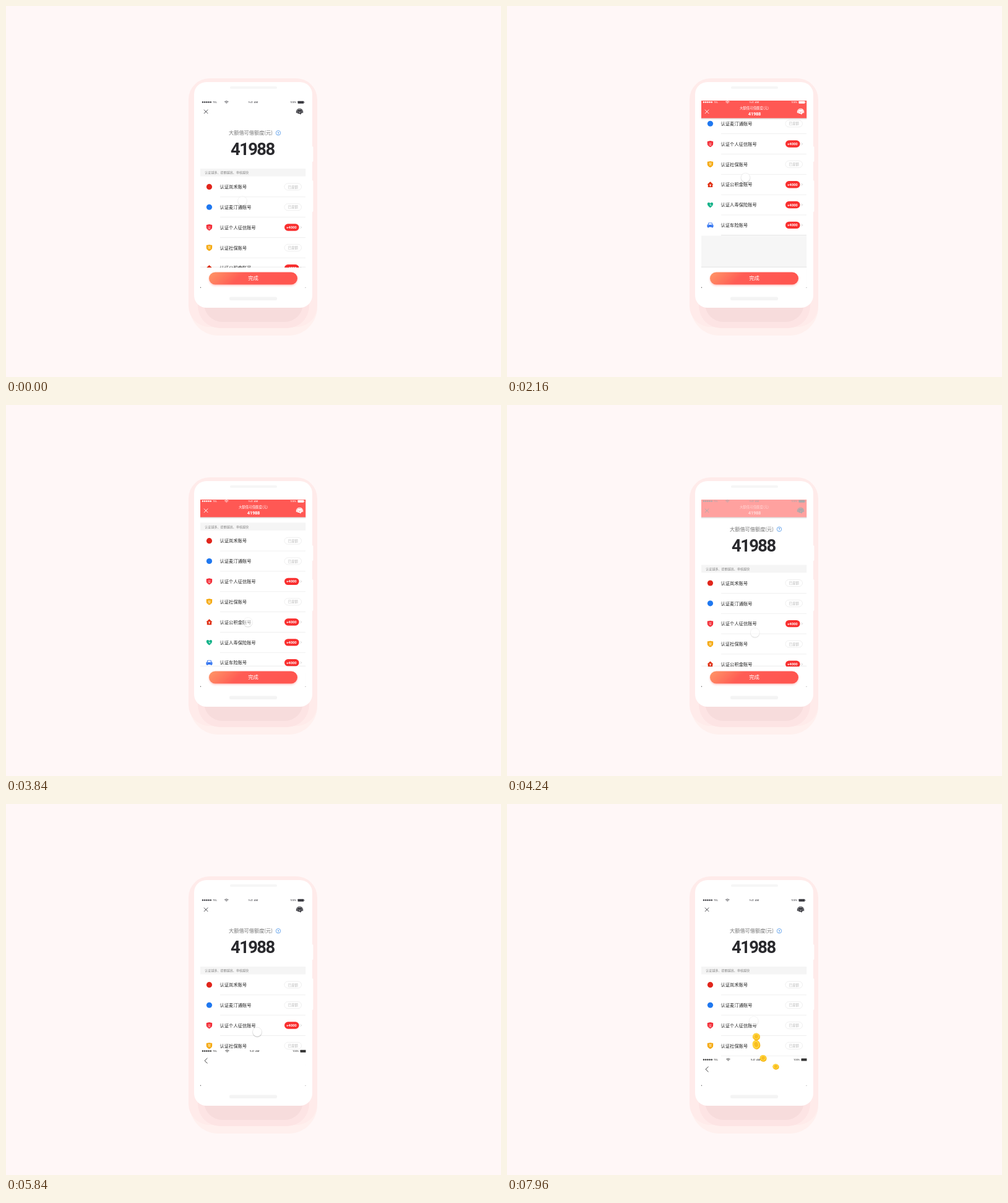
Animation, 800 px wide and 600 px high, one loop 8000 ms. Source, as an HTML page:

```html
<!DOCTYPE html>
<html lang="zh-CN">
<head>
<meta charset="utf-8">
<style>
html, body { margin: 0; width: 100%; height: 100%; overflow: hidden; background: #fff7f7; }
svg { display: block; width: 100vw; height: 100vh; }
text { font-family: "Noto Sans CJK SC", "Noto Sans CJK JP", "Noto Sans CJK", sans-serif; }
.num { font-family: Roboto, "Liberation Sans", sans-serif; font-weight: 700; }
.bar text { font-family: Roboto, "Liberation Sans", sans-serif; font-size: 4.2px; }
.mid { text-anchor: middle; }
.line { fill: none; stroke: currentColor; stroke-linecap: round; stroke-linejoin: round; }
</style>
</head>
<body>
<svg id="stage" viewBox="0 0 800 600"></svg>
<script>
const LOOP = 8000;
const rect = (x, y, w, h, r, fill, more = '') =>
  `<rect x="${x}" y="${y}" width="${w}" height="${h}" rx="${r}" fill="${fill}" ${more}/>`;
const text = (s, x, y, size, fill, more = '') =>
  `<text x="${x}" y="${y}" font-size="${size}" fill="${fill}" ${more}>${s}</text>`;
const dot = (x, y, r, fill, more = '') =>
  `<circle cx="${x}" cy="${y}" r="${r}" fill="${fill}" ${more}/>`;
const path = (d, more) => `<path d="${d}" ${more}/>`;
const mid = 'class="mid"';

const shieldPath = 'M0-18.5Q9-15.2 17.3-15.5V0C17.3 9 9 14.5 0 18.8C-9 14.5-17.3 9-17.3 0V-15.5Q-9-15.2 0-18.5Z';
const shield = (fill, char) =>
  path(shieldPath, `fill="${fill}"`) + text(char, 0, 5.6, 18, '#fff', mid + ' font-weight="500"');
const small = s => `<g transform="scale(.27)">${s}</g>`;

const icons = [
  dot(0, 0, 4.6, '#e1251b'),
  dot(0, 0, 4.6, '#1f78f0'),
  small(shield('#f32b35', '征')),
  small(shield('#f5a80c', '保')),
  path('M-5 0L0-4.8L5 0H3.7V4.4H-3.7V0Z', 'fill="#e02d10"') + text('¥', 0, 3, 5, '#fff', 'class="num mid"'),
  path('M0 4.6C-6 1-5.4-3.8-2.6-3.8Q-.8-3.8 0-2.4Q.8-3.8 2.6-3.8C5.4-3.8 6 1 0 4.6Z', 'fill="#16b38a"') +
    path('M0-1.2V.8H2', 'fill="none" stroke="#fff" stroke-width=".8"'),
  path('M-5-.3L-3.9-1L-3-4H3L3.9-1L5-.3V3H4V4.2H2.4V3H-2.4V4.2H-4V3H-5Z', 'fill="#2b6ff0"') +
    path('M-2.6-1L-2.1-2.9H2.1L2.6-1ZM-3.8.6H-2.2M2.2.6H3.8', 'fill="#fff" stroke="#fff" stroke-width=".5"')
];
const labels = ['岚禾', '麦汀通', '个人征信', '社保', '公积金', '人寿保险', '车险'];

const doneBadge = rect(450, -5.5, 27.5, 11, 5.5, '#fff', 'stroke="#e9e9e9" stroke-width=".7"') +
  text('已提额', 463.8, 2.1, 5.5, '#bcbcbc', mid);
const plusBadge = rect(450, -5.7, 23.6, 11.4, 5.7, '#f92f2f') +
  text('+4000', 461.4, 2.1, 5.8, '#fff', 'class="num mid"') +
  path('M476-1.6L477.6 0L476 1.6', 'fill="none" stroke="#bbb" stroke-width=".7"');

const row = (name, i) => `<g transform="translate(0 ${292.4 + i * 32.83})">
  <g transform="translate(328.5 0)">${icons[i]}</g>
  ${text(`认证${name}账号`, 345.5, 2.7, 7.3, '#222', 'font-weight="500"')}
  ${i == 2 ? `<g id="plus">${plusBadge}</g><g id="done">${doneBadge}</g>` : i < 4 ? doneBadge : plusBadge}
  ${rect(346, 16, 138, .8, 0, i == 6 ? '#d8d8d8' : '#ececec')}</g>`;

// Status bar: mx and rx shift the middle and right parts
const statusBar = (mx, rx) => `<g class="bar" fill="currentColor">
  ${[0, 1, 2, 3, 4].map(i => dot(318 + i * 3.2, 155.6, 1.25, 'currentColor')).join('')}
  ${text('TEL', 334, 157.1, 4.2, 'currentColor')}
  <g transform="translate(${356.3 + mx / 2} 157.6)">
    ${path('M-2.9-2.9Q0-5.3 2.9-2.9M-1.7-1.6Q0-3 1.7-1.6', 'class="line" stroke-width=".8"')}${dot(0, -.5, .6, 'currentColor')}</g>
  ${text('9:41 AM', 399.3 + mx, 157.1, 4.2, 'currentColor', mid)}
  ${text('100%', 459 + rx, 157.1, 4.2, 'currentColor')}
  ${rect(471.5 + rx, 153.7, 9.8, 4, .6, 'currentColor')}${rect(481.7 + rx, 154.9, .8, 1.6, .3, 'currentColor')}</g>`;

const coin = (rx, ry, turn) => `<g class="coin"><g transform="rotate(${turn})">
  <ellipse rx="${rx}" ry="${ry}" fill="#f5b512"/>
  <ellipse cx="-.5" cy="-.6" rx="${rx - .8}" ry="${ry - .9}" fill="#ffd63f"/>
  <ellipse cx="-.3" cy="-.4" rx="${rx * .5}" ry="${ry * .55}" fill="#f8bd22"/></g></g>`;
// Each coin: progress along the arc at 7960 ms, offset, radii, turn
const coins = [[.2, 1.5, 0, 5.2, 4.6, 10], [.45, -2, 3, 5.6, 5.4, 30], [.7, -3, 1, 6.2, 7.6, -15], [.83, -.5, 0, 6, 5.8, 20]];

const title = '大额借可借额度(元)';
const $ = id => document.getElementById(id);

$('stage').innerHTML = `
<defs>
  <clipPath id="screen"><rect x="314" y="153" width="170.5" height="303"/></clipPath>
  <linearGradient id="warm" x1="0" y1="0" x2="1" y2=".15"><stop offset="0" stop-color="#ff9868"/><stop offset=".4" stop-color="#ff5c54"/><stop offset="1" stop-color="#ff5650"/></linearGradient>
  <linearGradient id="red" x1="0" y1="0" x2="1" y2="0"><stop offset="0" stop-color="#ff2230"/><stop offset="1" stop-color="#ff5c5a"/></linearGradient>
  <linearGradient id="shade" x1="0" y1="0" x2="0" y2="1"><stop offset="0" stop-color="#000" stop-opacity=".18"/><stop offset="1" stop-color="#000" stop-opacity="0"/></linearGradient>
  <filter id="glow" x="-20%" y="-40%" width="140%" height="200%"><feDropShadow dx="0" dy="1.6" stdDeviation="1.4" flood-color="#ff5650" flood-opacity=".35"/></filter>
  <filter id="drop" x="-40%" y="-40%" width="180%" height="180%"><feDropShadow dx="0" dy=".8" stdDeviation=".7" flood-color="#000" flood-opacity=".35"/></filter>
</defs>
${rect(0, 0, 800, 600, 0, '#fff7f7')}
${rect(297, 400, 206, 133, 46, '#fff0ee')}
${rect(295, 117, 208, 402, 34, '#ffebea')}
${rect(310, 420, 180, 101, 36, '#fde4e4')}
${rect(320, 430, 160, 81, 30, '#f7dcdc')}
${rect(490, 227, 6.4, 25, 1.5, '#fff')}${rect(490, 282, 6.4, 51, 1.5, '#fff')}
${rect(304, 123, 191, 365, 20, '#fff')}
${rect(362, 130, 76, 4, 2, '#f6f6f6')}${rect(361, 470.5, 77, 5.5, 2, '#f4f4f4')}
<g clip-path="url(#screen)">
  <g id="list">
    ${text(title, 360, 208.2, 8.2, '#777')}
    ${dot(440, 205.3, 3.7, 'none', 'stroke="#4a94e8" stroke-width=".8"')}${text('?', 440, 207.6, 6, '#4a94e8', 'class="num mid"')}
    ${text('41988', 398.3, 241.2, 27.5, '#2a2a2e', 'class="num mid" letter-spacing="-1.7"')}
    ${rect(314, 263, 170.5, 12.6, 0, '#f5f5f5')}
    ${text('认证越多、提额越高、审核越快', 321.3, 271.3, 5.07, '#888')}
    ${labels.map(row).join('')}
    ${rect(314, 506.6, 170.5, 300, 0, '#f6f6f6')}
  </g>
  ${rect(314, 421.5, 170.5, 2, 0, '#000', 'opacity=".05"')}${rect(314, 423, 170.5, 33, 0, '#fff')}
  ${rect(328, 430.5, 143, 20, 10, 'url(#warm)', 'filter="url(#glow)"')}
  ${text('完成', 399.5, 443.4, 8.4, '#fff', mid + ' font-weight="500"')}
  ${rect(314, 181, 170.5, 3, 0, 'url(#shade)', 'id="edge"')}
  <g id="head">
    <rect id="headBg" x="314" y="153" width="170.5" height="28.4"/>
    ${statusBar(0, 0)}
    ${path('M320.2 167.9L326 173.7M326 167.9L320.2 173.7', 'class="line" stroke-width=".9"')}
    ${path('M469.7 171.5V170A4.8 3.8 0 0 1 479.3 170V171.5', 'class="line" stroke-width="1.1"')}
    ${rect(468.9, 169.3, 1.6, 4, .7, 'currentColor')}${rect(478.5, 169.3, 1.6, 4, .7, 'currentColor')}
    ${path('M472 167.6H477Q478 167.6 478 168.6V173Q478 174 477 174H476.3L476.5 176L474 174H472Q471 174 471 173V168.6Q471 167.6 472 167.6Z', 'fill="currentColor"')}
    <path id="smile" d="M472.6 171.2Q474.5 173.2 476.4 171.2" fill="none" stroke-width=".8"/>
    <g id="headText">${text(title, 399.5, 167.3, 5.45, '#fff', mid)}
    ${text('41988', 400, 177.1, 7.6, '#fff', 'class="num mid" letter-spacing="-.3"')}</g>
  </g>
  <g id="page" color="#333">
    ${rect(314, 153, 170.5, 320, 0, '#fff')}
    ${statusBar(2.3, 4)}
    ${path('M325.2 167.2L321 171.2L325.2 175.2', 'class="line" stroke-width=".9"')}
    <g transform="translate(399.5 260)">${shield('url(#red)', '征')}</g>
    ${rect(366.5, 343.5, 66, 18, 9, 'url(#warm)', 'filter="url(#glow)"')}
    ${text('认证', 399.3, 355.1, 7.2, '#fff', mid + ' font-weight="500"')}
  </g>
  ${coins.map(c => coin(c[3], c[4], c[5])).join('')}
  <g id="touch">${dot(0, 0, 7.4, '#fff', 'stroke="#d4d4d4" stroke-width=".4" filter="url(#drop)"')}</g>
</g>
${dot(314.5, 455.3, .7, '#555')}${dot(484, 455.3, .5, '#777')}`;

const inOut = (p, n) => p < .5 ? 2 ** (n - 1) * p ** n : 1 - 2 ** (n - 1) * (1 - p) ** n;

// Keys are [time, value, power of the ease that leads to this key]
function track(t, keys) {
  let [t0, v0] = keys[0];
  for (const [t1, v1, n = 3] of keys) {
    if (t < t1) return t <= t0 ? v0 : v0 + (v1 - v0) * inOut((t - t0) / (t1 - t0), n);
    [t0, v0] = [t1, v1];
  }
  return v0;
}

const scrollKeys = [[460, 0], [2180, 135], [2850, 135], [4870, -2, 5], [5280, 0]];
const headKeys = [[1040, 0], [1850, 1, 1], [3960, 1], [4600, 0, 1]];
const edgeKeys = [[1000, 0], [1500, 1, 1], [4700, 1], [5100, 0, 1]];
const pageKeys = [[5500, 303], [6440, -6], [6500, -6], [7120, 0], [7660, 0], [8112, 303]];
const touchX = [[460, 382], [1300, 385.5], [3000, 385.5], [5064, 406], [5700, 406], [6440, 407], [6500, 407], [7180, 398.8]];
const touchY = [[460, 315], [1300, 277.5], [3000, 277.5], [4317, 368], [5700, 368], [6440, 387], [6500, 387], [7180, 350.7]];
const touchAlpha = [[900, .55], [1280, .9], [2900, .9], [3200, .55], [4200, .55], [4700, 1], [5380, 1],
  [5460, .55], [5560, .55], [5700, 1], [7180, 1], [7400, .55]];

const move = (el, x, y) => el.setAttribute('transform', `translate(${x} ${y})`);
const show = (el, on) => el.style.display = on ? '' : 'none';
const mix = (a, b, p) => `rgb(${a.map((v, i) => Math.round(v + (b[i] - v) * p))})`;
const coinEls = document.querySelectorAll('.coin');

function draw(t) {
  const h = track(t, headKeys), bg = mix([255, 255, 255], [255, 88, 84], h);
  move($('list'), 0, -track(t, scrollKeys));
  $('head').style.color = mix([58, 58, 64], [255, 255, 255], h);
  $('headBg').style.fill = bg;
  $('smile').style.stroke = bg;
  $('headText').style.opacity = h;
  $('edge').style.opacity = track(t, edgeKeys);

  show($('page'), t > 5500);
  move($('page'), 0, track(t, pageKeys));
  show($('plus'), t < 6800);
  show($('done'), t >= 6800);

  move($('touch'), track(t, touchX), track(t, touchY));
  $('touch').style.opacity = track(t, touchAlpha);

  coins.forEach(([end, dx, dy], i) => {
    const u = end - (7960 - t) / 220, v = 1 - u;
    show(coinEls[i], u > 0);
    move(coinEls[i], v * v * 452 + 2 * u * v * 400 + u * u * 403 + dx, v * v * 436 + 2 * u * v * 412 + u * u * 360 + dy);
  });
}

const start = performance.now();
(function tick() {
  draw((performance.now() - start) % LOOP);
  requestAnimationFrame(tick);
})();
</script>
</body>
</html>
```
